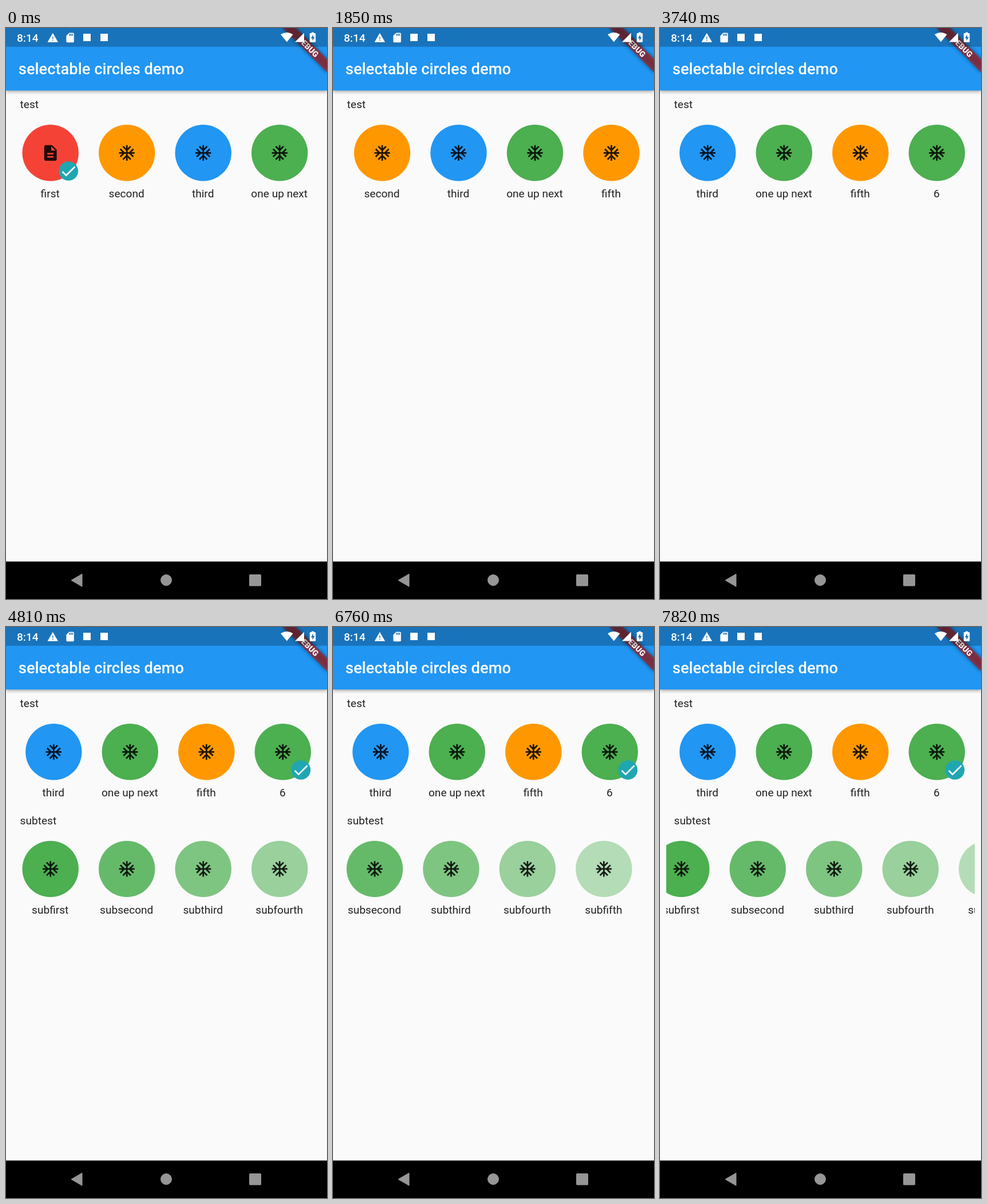
Animation of 561x998 px, one loop 8 s. Source, as an HTML page:

```html
<!DOCTYPE html>
<html lang="en">
<head>
<meta charset="utf-8">
<title>selectable circles demo</title>
<style>
  html, body { margin: 0; width: 100%; height: 100%; overflow: hidden; background: #fafafa; }
  svg { display: block; width: 561px; height: 998px; font: 19.1px Roboto, "Noto Sans", sans-serif; }
  .ink { fill: rgba(0, 0, 0, .87); }
  .bold { font-weight: 500; fill: #fff; }
  .label { text-anchor: middle; }
</style>
</head>
<body>
<svg viewBox="0 0 561 998">
  <defs>
    <clipPath id="list"><rect x="10.9" y="158" width="539.2" height="156"/></clipPath>
    <filter id="soft" x="-20%" y="-60%" width="140%" height="220%"><feGaussianBlur stdDeviation="3.5"/></filter>
    <filter id="lift" x="-5%" y="-20%" width="110%" height="140%"><feGaussianBlur stdDeviation="3"/></filter>
    <path id="flake" d="M22 11h-4.17l3.24-3.24-1.41-1.42L15 11h-2V9l4.66-4.66-1.42-1.41L13 6.17V2h-2v4.17L7.76 2.93 6.34 4.34 11 9v2H9L4.34 6.34 2.93 7.76 6.17 11H2v2h4.17l-3.24 3.24 1.41 1.42L9 13h2v2l-4.66 4.66 1.42 1.41L11 17.83V22h2v-4.17l3.24 3.24 1.42-1.41L13 15v-2h2l4.66 4.66 1.41-1.42L17.83 13H22z"/>
    <path id="doc" d="M14 2H6c-1.1 0-1.99.9-1.99 2L4 20c0 1.1.89 2 1.99 2H18c1.1 0 2-.9 2-2V8l-6-6zm2 16H8v-2h8v2zm0-4H8v-2h8v2zm-3-5V3.5L18.5 9H13z"/>
    <g id="tick">
      <circle r="16.8" fill="#1fa6b2"/>
      <path transform="scale(1.365) translate(-12 -12)" fill="#fff" d="M9 16.17L4.83 12l-1.42 1.41L9 19 21 7l-1.41-1.41z"/>
    </g>
  </defs>

  <rect width="561" height="998" fill="#fafafa"/>
  <rect y="4" width="561" height="107" opacity=".38" filter="url(#lift)"/>
  <rect width="561" height="109.2" fill="#2196f3"/>
  <text class="bold" x="21.8" y="81" font-size="27.3">selectable circles demo</text>

  <g>
    <text class="ink" x="24.6" y="140">test</text>
    <g clip-path="url(#list)">
      <g id="main"></g>
      <path id="glow" fill="#2196f3"/>
    </g>
  </g>
  <g id="subBlock" transform="translate(0 204.6)">
    <text class="ink" x="24.6" y="140">subtest</text>
    <g clip-path="url(#list)"><g id="sub"></g></g>
  </g>

  <g transform="translate(561 0) rotate(45)">
    <rect x="-54.6" y="38.2" width="109.2" height="16.4" opacity=".5" filter="url(#soft)"/>
    <rect x="-54.6" y="38.2" width="109.2" height="16.4" fill="#b71c1c" fill-opacity=".63"/>
    <text class="label" x="0" y="51.3" font-size="13.9" font-weight="900" fill="#fff">DEBUG</text>
  </g>

  <rect width="561" height="32.8" opacity=".23"/>
  <text class="bold" x="19" y="23.8" font-size="19.1">8:14</text>
  <g fill="#fff">
    <path transform="translate(71.7 7) scale(.84)" d="M1 21h22L12 2 1 21zm12-3h-2v-2h2v2zm0-4h-2v-4h2v4z"/>
    <path transform="translate(102 6.8) scale(.84)" d="M18 2h-8L4.02 8 4 20c0 1.1.9 2 2 2h12c1.1 0 2-.9 2-2V4c0-1.1-.9-2-2-2zm-6 6h-2V4h2v4zm3 0h-2V4h2v4zm3 0h-2V4h2v4z"/>
    <rect x="135" y="10" width="13" height="13"/>
    <rect x="165" y="10" width="13" height="13"/>
    <path d="M490.8 24.5L480 11.3Q490.8 4 501.6 11.3z"/>
    <path d="M521 8.5V24.5H505z"/>
    <path fill-rule="evenodd" d="M534 9V7.5h4V9h2q1.2 0 1.2 1.2V23.5q0 1.2-1.2 1.2h-8q-1.2 0-1.2-1.2V10.2Q530.8 9 532 9zM537 11.5l-4 6.5h2.5v4.5l4-6.5H537z"/>
  </g>

  <rect y="932.5" width="561" height="65.5"/>
  <g fill="#969696" stroke="#969696" stroke-linejoin="round">
    <path d="M114 965.3L133 954.2V976.3z"/>
    <circle cx="280" cy="965" r="9.5"/>
    <rect x="425.5" y="955.5" width="20" height="19.5" rx="1"/>
  </g>
</svg>

<script>
const LOOP = 8000, PITCH = 133.5, FIRST_X = 77.7, ROW_Y = 218.3, END = 261.4;
const SELECT = 3900, STEP = 40;
const GREEN = '#4caf50';
const $ = id => document.getElementById(id);

const mainItems = [
  ['first', '#f44336'], ['second', '#ff9800'], ['third', '#2196f3'],
  ['one up next', GREEN], ['fifth', '#ff9800'], ['6', GREEN]
];
const subItems = ['first', 'second', 'third', 'fourth', 'fifth', 'sixth']
  .map((name, i) => ['sub' + name, GREEN, 1 - .15 * i]);

const itemSvg = ([label, color, alpha = 1], i) => `
  <g transform="translate(${FIRST_X + PITCH * i} ${ROW_Y})">
    <circle r="49.2" fill="${color}" fill-opacity="${alpha}"/>
    <use href="#${label === 'first' ? 'doc' : 'flake'}" class="ink" transform="scale(1.365) translate(-12 -12)"/>
    <text class="ink label" x="-.5" y="78">${label}</text>
  </g>`;

$('main').innerHTML = mainItems.map(itemSvg).join('') + '<use id="badge" href="#tick"/>';
$('sub').innerHTML = subItems.map(itemSvg).join('');

const ease = {
  lin: u => u,
  in: u => u ** 1.4,
  out: u => 1 - (1 - u) ** 2,
  both: u => (1 - Math.cos(Math.PI * u)) / 2
};

// Each step: time, value, easing used to arrive there.
const mainScroll = [[1660, 0], [1840, 125.2, 'in'], [2140, END, 'out']];
const subScroll = [
  [6540, 0], [6760, 138.3, 'in'], [7060, 230, 'out'],
  [7400, 157.7, 'in'], [7800, 40.4, 'out']
];
const glowWidth = [
  [2120, 0], [2260, 3, 'out'], [2420, 3], [2920, 11, 'out'],
  [3140, 11], [3740, 0, 'out']
];

function valueAt(steps, t) {
  const i = steps.findIndex(s => s[0] > t);
  if (i === 0) return steps[0][1];
  if (i < 0) return steps[steps.length - 1][1];
  const [t0, a] = steps[i - 1], [t1, b, kind = 'lin'] = steps[i];
  return a + (b - a) * ease[kind]((t - t0) / (t1 - t0));
}

function elasticOut(u) {
  if (u >= 1) return 1;
  return 1 + 2 ** (-10 * u) * Math.sin((u - .1) * Math.PI * 5);
}

function draw(t) {
  const drag = Math.floor((t + 15) / STEP) * STEP;
  $('main').setAttribute('transform', `translate(${-valueAt(mainScroll, drag)} 0)`);
  $('sub').setAttribute('transform', `translate(${-valueAt(subScroll, drag)} 0)`);

  const chosen = t >= SELECT;
  $('subBlock').style.display = chosen ? '' : 'none';
  const x = FIRST_X + 31.6 + (chosen ? 5 * PITCH : 0);
  const size = chosen ? elasticOut((t - SELECT + STEP) / 1000) : 1;
  $('badge').setAttribute('transform', `translate(${x} ${ROW_Y + 31.7}) scale(${size})`);

  const w = valueAt(glowWidth, t);
  $('glow').setAttribute('d', `M550.1 158H${550.1 - w * .7}Q${550.1 - w * 1.3} 236 ${550.1 - w * .7} 314H550.1z`);
  $('glow').setAttribute('opacity', Math.min(.12, w * .01));
}

const start = performance.now();
function tick() {
  draw((performance.now() - start) % LOOP);
  requestAnimationFrame(tick);
}
tick();
</script>
</body>
</html>
```
